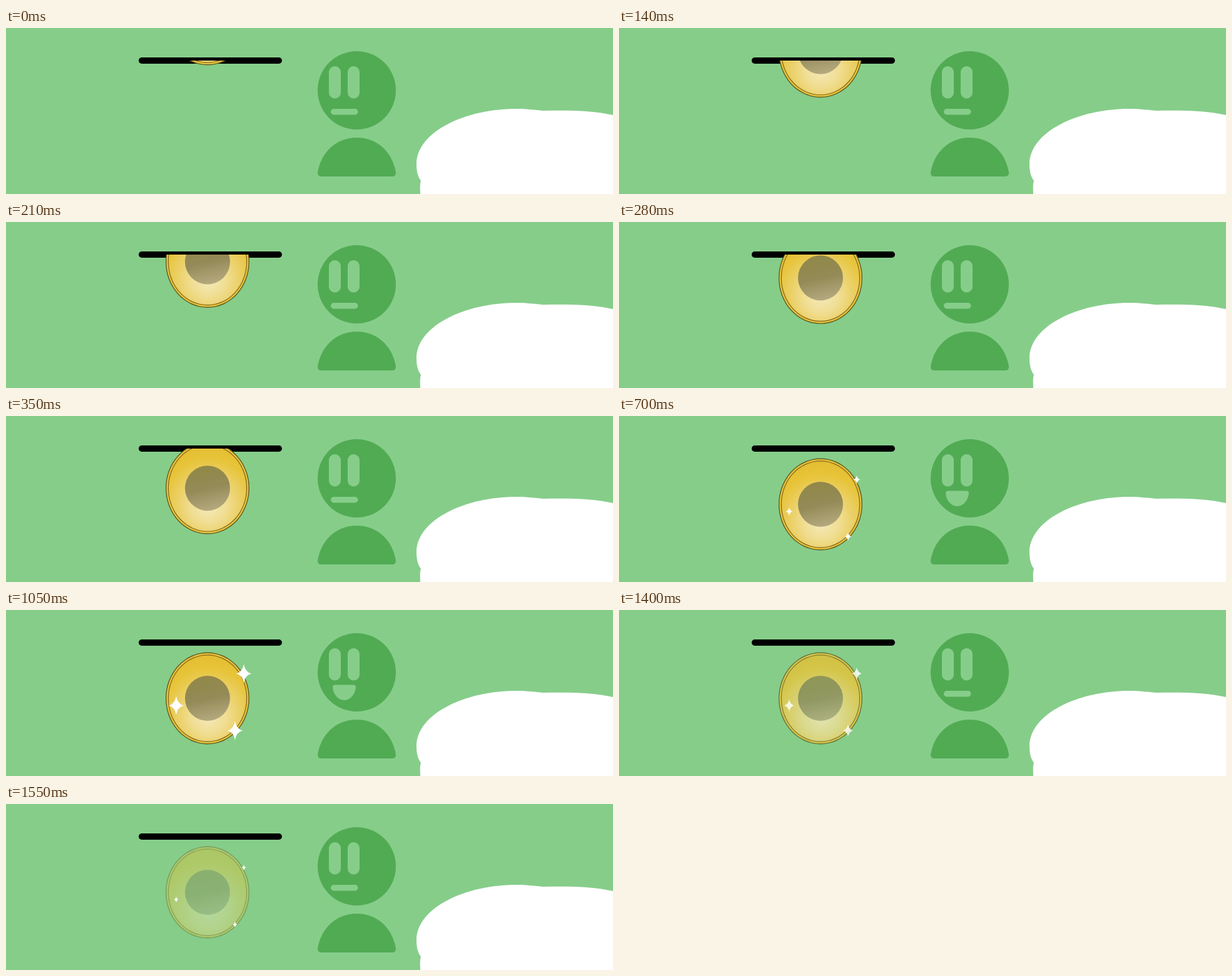
An HTML page with a canvas that plays this animation: 970x265 px, repeating every 1.7 s.

```html
<!DOCTYPE html>
<html lang="en">
<head>
<meta charset="utf-8">
<title>Coin drop</title>
<style>
  html, body { margin: 0; width: 100%; height: 100%; overflow: hidden; background: #86cd8a; }
  canvas { display: block; }
</style>
</head>
<body>
<canvas id="stage" width="970" height="265"></canvas>
<script>
const ctx = document.getElementById('stage').getContext('2d');
const LOOP = 1700, STEP = 70;
const BG = '#86cd8a', DARK = '#51ab53';
const SLOT_Y = 52, COIN_X = 322, COIN_Y = 141;
const SPARKLES = [[380, 101.5], [272, 152.5], [366, 192.5]];

function pill(x, y, w, h, color) {
  ctx.fillStyle = color;
  ctx.beginPath();
  ctx.roundRect(x, y, w, h, Math.min(w, h) / 2);
  ctx.fill();
}

function ellipse(x, y, rx, ry, color) {
  ctx.fillStyle = color;
  ctx.beginPath();
  ctx.ellipse(x, y, rx, ry, 0, 0, Math.PI * 2);
  ctx.fill();
}

function fillPath(d, color) {
  ctx.fillStyle = color;
  ctx.fill(new Path2D(d));
}

function gradient(g, colors) {
  colors.forEach((c, i) => g.addColorStop(i / (colors.length - 1), c));
  return g;
}

function drawCoin(y, opacity) {
  ctx.save();
  ctx.beginPath();
  ctx.rect(0, SLOT_Y, 970, 265);
  ctx.clip();
  ctx.translate(COIN_X, y);
  ellipse(0, 0, 67, 73.5, '#5f5d25');
  ellipse(0, 0, 65.6, 72.1, '#e8c43a');
  ellipse(0, 0, 63.2, 69.7, '#81631c');
  const face = gradient(ctx.createRadialGradient(2, 30, 5, 2, 22, 94),
    ['#f4e7b2', '#f0de94', '#ebd067', '#e7c439', '#e4bd30']);
  ellipse(0, 0, 62, 68.5, face);
  const disc = gradient(ctx.createLinearGradient(-8, -36, 8, 36),
    ['#918848', '#938a57', '#b6aa80']);
  ellipse(0, 0, 36, 36, disc);
  if (opacity < 1) {
    ctx.globalAlpha = 1 - opacity;
    ellipse(0, 0, 67.5, 74, BG);
  }
  ctx.restore();
}

function drawSparkle([x, y], size, opacity) {
  const rx = 12 * size, ry = 15 * size, k = 0.17;
  ctx.save();
  ctx.translate(x, y);
  ctx.globalAlpha = opacity;
  ctx.fillStyle = '#fff';
  ctx.beginPath();
  ctx.moveTo(0, -ry);
  ctx.quadraticCurveTo(rx * k, -ry * k, rx, 0);
  ctx.quadraticCurveTo(rx * k, ry * k, 0, ry);
  ctx.quadraticCurveTo(-rx * k, ry * k, -rx, 0);
  ctx.quadraticCurveTo(-rx * k, -ry * k, 0, -ry);
  ctx.fill();
  ctx.restore();
}

function drawPerson(smiling) {
  ellipse(560.5, 99.5, 62.5, 62.5, DARK);
  pill(516, 61, 19, 51.5, BG);
  pill(546, 61, 19, 51.5, BG);
  if (smiling) {
    fillPath('M526 119.5H555Q559 119.5 559 123.5C558 135 550 144 540.5 144C531 144 523 135 522 123.5Q522 119.5 526 119.5Z', BG);
  } else {
    pill(519, 129, 43.5, 9.5, BG);
  }
  fillPath('M498 231C503 199 527 175 560.5 175C594 175 618 199 623 231Q623 237 617 237H504Q498 237 498 231Z', DARK);
}

// Progress is held between steps; the fade-out has two longer ones.
function poseAt(t) {
  if (t >= 1550) return { drop: 1, opacity: 0.42, sparkle: 0.32, glow: 1, smiling: false };
  if (t >= 1400) return { drop: 1, opacity: 0.8, sparkle: 0.66, glow: 0.82, smiling: false };
  const step = Math.min(15, Math.floor(t / STEP));
  return {
    drop: Math.min(1, step / 6),
    opacity: 1,
    sparkle: Math.max(0, (step - 6) / 9),
    glow: 1,
    smiling: step >= 7
  };
}

function draw(t) {
  const pose = poseAt(t);
  ctx.fillStyle = BG;
  ctx.fillRect(0, 0, 970, 265);
  fillPath('M662 265C662 257 661 250 663 244C658 237 656 229 656 218C656 165 735 129 815 129C835 129 845 131 858 132C900 131 940 132 970 139V265Z', '#fff');
  drawPerson(pose.smiling);
  pill(212, 47, 229, 10, '#000');
  drawCoin(COIN_Y - 155 * (1 - pose.drop), pose.opacity);
  if (pose.sparkle > 0) {
    SPARKLES.forEach(p => drawSparkle(p, pose.sparkle, pose.glow));
  }
}

const start = performance.now();
function frame() {
  draw((performance.now() - start) % LOOP);
  requestAnimationFrame(frame);
}
frame();
</script>
</body>
</html>
```
